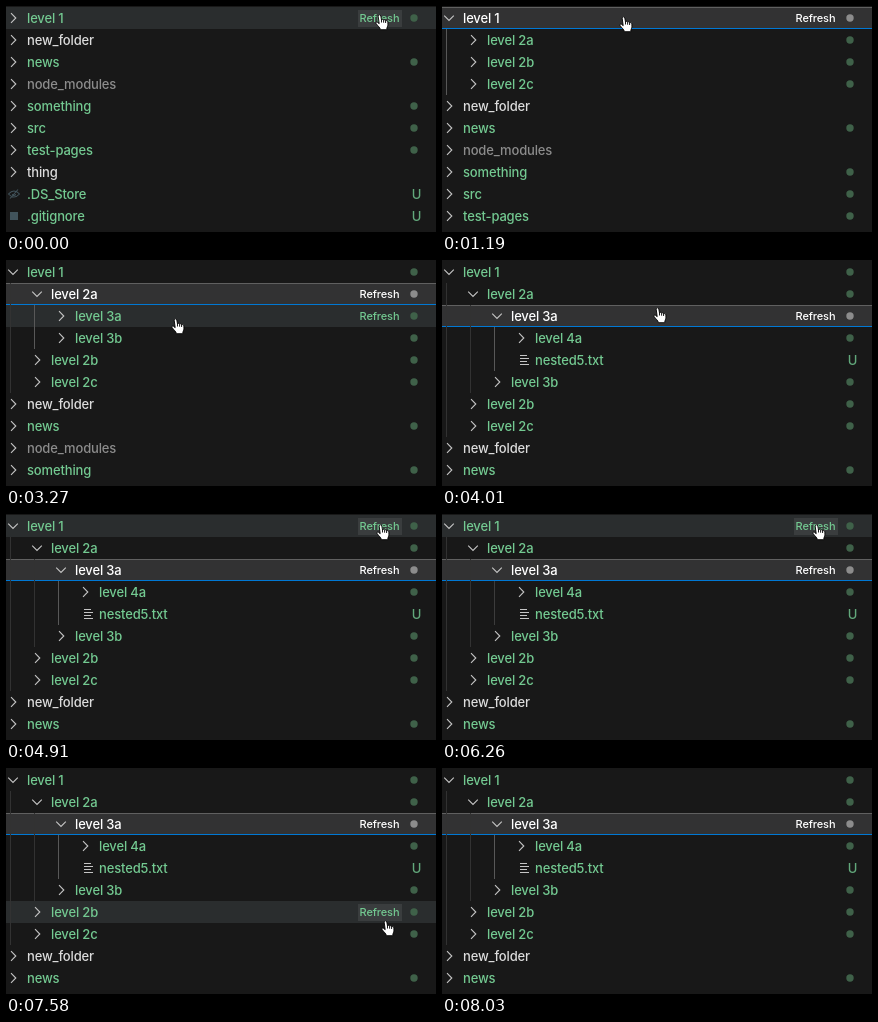
Write an HTML page that moves like this. It is 430 by 226 pixels and loops after 8.2 s.

```html
<!DOCTYPE html>
<html lang="en">
<head>
<meta charset="utf-8">
<title>File tree</title>
<style>
html, body { margin: 0; width: 100%; height: 100%; overflow: hidden; background: #181818; }
svg { display: block; }
text { font: 500 13px Inter, Roboto, sans-serif; letter-spacing: -.15px; white-space: pre; }
.small { font-size: 11px; letter-spacing: -.1px; }
.icon { fill: none; stroke: #c5c5c5; stroke-width: 1.1; }
.hand { fill: #fff; stroke: #000; stroke-width: .9; stroke-linejoin: round; }
</style>
</head>
<body>
<svg id="stage" width="430" height="226" viewBox="0 0 430 226"></svg>
<script>
const LOOP = 8200, STEP = 148, ROW = 22, TOP = 1, INDENT = 24, HEIGHT = 226;
const GREEN = '#73c991', PLAIN = '#dcdcdc', MUTED = '#8c8c8c';

const dir = (name, kids = [], color = GREEN) => ({ name, kids, color, dir: true });
const file = (name, icon) => ({ name, icon, color: GREEN, kids: [] });

const tree = [
  dir('level 1', [
    dir('level 2a', [
      dir('level 3a', [dir('level 4a'), file('nested5.txt', 'lines')]),
      dir('level 3b')
    ]),
    dir('level 2b'),
    dir('level 2c')
  ]),
  dir('new_folder', [], PLAIN), dir('news'), dir('node_modules', [], MUTED),
  dir('something'), dir('src'), dir('test-pages'), dir('thing', [], PLAIN),
  file('.DS_Store', 'eye'), file('.gitignore', 'square')
];

// The pointer glides to each place in even steps, slowing down.
const home = { x: 369, y: 8 };
const moves = [
  { from: 140, to: 290, x: 305, y: 8 },
  { from: 590, to: 1340, x: 172, y: 10 },
  { from: 1780, to: 2080, x: 170, y: 32 },
  { from: 2830, to: 3270, x: 165, y: 58 },
  { from: 4010, to: 4910, x: 370, y: 10 },
  { from: 6990, to: 7290, x: 366, y: 12 },
  { from: 7430, to: 8030, x: 381, y: 250 }
];
const clicks = [
  { at: 1190, name: 'level 1' },
  { at: 2830, name: 'level 2a' },
  { at: 3570, name: 'level 3a' }
];
const reload = { from: 6260, to: 6400 };

function pointerAt(t) {
  let { x, y } = home;
  for (const m of moves) {
    if (t < m.from) break;
    const gaps = Math.round((m.to - m.from) / STEP);
    const done = Math.floor((t - m.from + 1) / (m.to - m.from) * gaps) + 1;
    const ease = Math.sin(Math.min(1, done / (gaps + 1)) * Math.PI / 2);
    x += (m.x - x) * ease;
    y += (m.y - y) * ease;
  }
  return { x: Math.round(x), y: Math.round(y) };
}

const rect = (x, y, w, h, fill) =>
  `<rect x="${x}" y="${y}" width="${w}" height="${h}" fill="${fill}"/>`;
const label = (x, y, str, fill, cls = '') =>
  `<text x="${x}" y="${y}" fill="${fill}" class="${cls}">${str}</text>`;
const path = (x, y, d, cls, extra = '') =>
  `<path transform="translate(${x} ${y})" d="${d}" class="${cls}" ${extra}/>`;

const HAND = 'M3.2 2.2C3.2.5 5.5.4 5.8 2L6.5 6C6.8 4.9 8.4 5 8.6 6.2C9 5.4 10.5 5.6 10.6 6.9' +
  'C11.3 6.2 12.9 6.7 12.9 8V10.8C12.9 12.2 11.9 13 11.7 15.7H5.5C5 13.5 2.9 12 1.2 9.8' +
  'C.2 8.5 1.6 7.5 2.7 8.4L4.2 9.7ZM6.5 6V8.5M8.6 6.2V8.7M10.6 6.9V9';

const icons = {
  lines: (x, y) => path(x, y, 'M-1 -4.5H6M-1 -1.5H8M-1 1.5H6M-1 4.5H8', 'icon'),
  eye: (x, y) => path(x, y, 'M-4.5 0Q1 -6 6.5 0Q1 6 -4.5 0ZM-3 4.5L5 -4.5M-.5 0A1.5 1.5 0 0 0 2.5 0',
    'icon', 'style="stroke:#41535b"'),
  square: (x, y) => rect(x - 3, y - 4, 8, 8, '#41535b')
};

function flatten(nodes, open, depth = 0, out = []) {
  for (const node of nodes) {
    const row = { node, depth, open: open.includes(node.name), index: out.length };
    out.push(row);
    if (row.open) flatten(node.kids, open, depth + 1, out);
    row.end = out.length;
  }
  return out;
}

function drawRow({ node, depth, open, index }, selected, hover, hot) {
  const y = TOP + index * ROW, mid = y + 11, x = depth * INDENT + 7;
  const color = selected ? '#fff' : node.color;
  let s = '';
  if (selected) {
    s += rect(0, y, 430, ROW, '#323233') + rect(0, y, 430, 1, '#606060') +
      rect(0, y + ROW - 1, 430, 1, '#0078d4');
  } else if (hover) {
    s += rect(0, y, 430, ROW, '#2a2d2e');
  }
  if (!node.dir) s += icons[node.icon](x, mid);
  else if (open) s += path(x, mid, 'M-4.8 -2.3L0 2.5L4.8 -2.3', 'icon');
  else s += path(x, mid, 'M-2 -4.8L2.8 0L-2 4.8', 'icon');
  s += label(x + 14, y + 15.7, node.name, color);

  if (node.dir && (selected || hover)) {
    if (hot) s += rect(352, y + 3, 44, 17, '#3a3d3e');
    s += label(353.5, y + 15, 'Refresh', color, 'small');
  }
  if (!node.dir) s += label(405.8, y + 15.7, 'U', '#62a87b');
  else if (node.color === GREEN)
    s += `<circle cx="408" cy="${mid}" r="3.7" fill="${selected ? '#8c8c8c' : '#3f6149'}"/>`;
  return s;
}

function drawGuide({ depth, index, end }, selected, dim) {
  const color = selected ? (dim ? '#3c3c3c' : '#585858') : '#323232';
  return rect(depth * INDENT + 4, TOP + (index + 1) * ROW, 1, (end - index - 1) * ROW, color);
}

function draw(t) {
  const { x, y } = pointerAt(t);
  const open = clicks.filter(c => c.at <= t).map(c => c.name);
  const current = open[open.length - 1];
  const dim = t >= reload.from && t < reload.to;
  const over = y < HEIGHT ? Math.floor((y + 2 - TOP) / ROW) : -1;
  const hot = x + 4 >= 352 && x + 4 <= 396;
  const rows = flatten(tree, open);
  return rows.map(r => {
    const hover = r.index === over;
    return drawRow(r, r.node.name === current, hover, hover && hot);
  }).join('') +
    rows.filter(r => r.open).map(r => drawGuide(r, r.node.name === current, dim)).join('') +
    path(x, y, HAND, 'hand');
}

const stage = document.getElementById('stage');
const start = performance.now();
let last = '';
function tick() {
  const svg = draw((performance.now() - start) % LOOP);
  if (svg !== last) stage.innerHTML = last = svg;
  requestAnimationFrame(tick);
}
tick();
</script>
</body>
</html>
```
